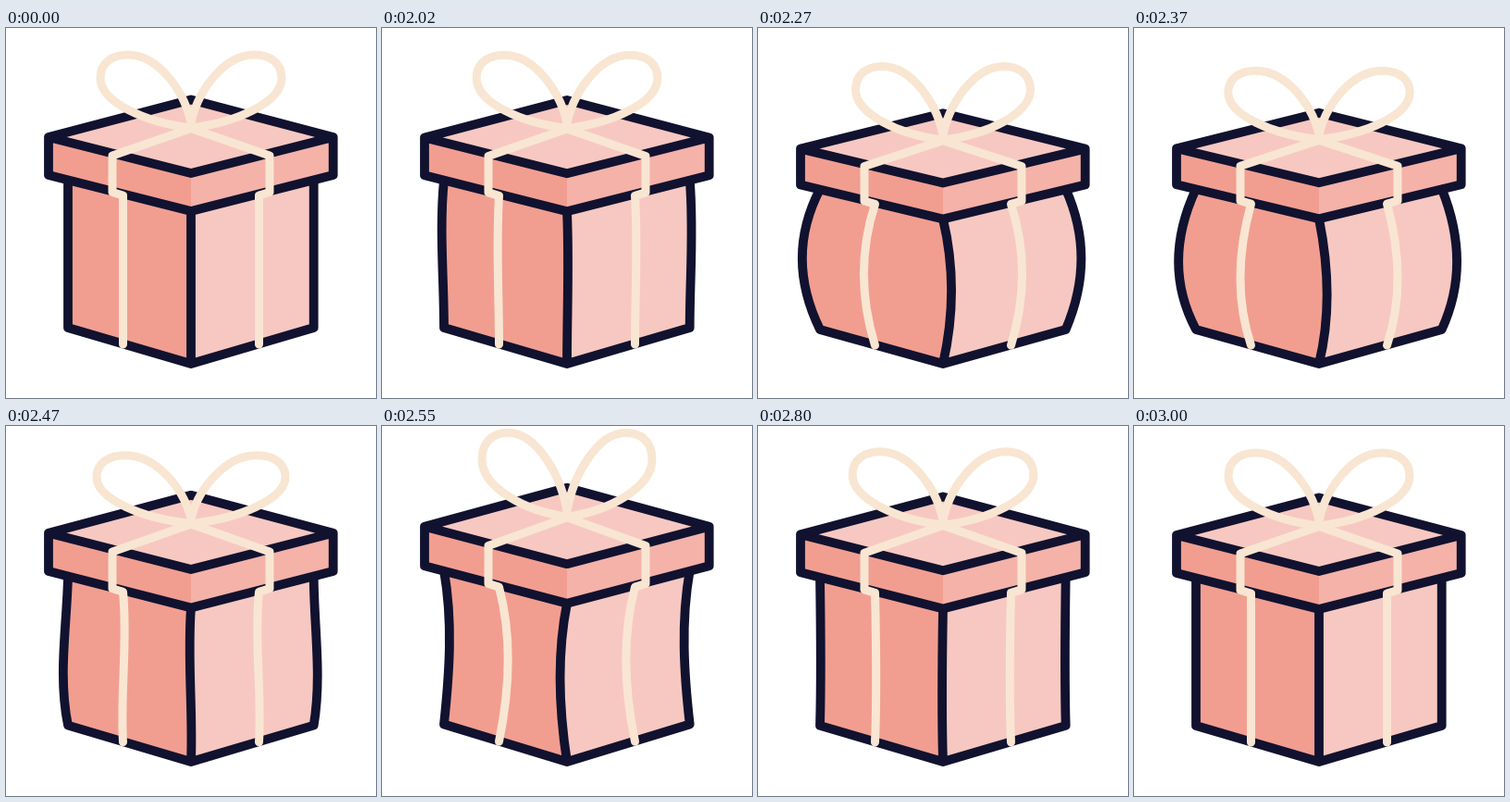
Recreate the animation shown at these times as an HTML page. Size 400 by 400 pixels, loop 3.02 s.

```html
<!DOCTYPE html>
<html lang="en">
<head>
<meta charset="utf-8">
<title>Gift box</title>
<style>
  html, body { margin: 0; width: 100%; height: 100%; overflow: hidden; background: #fff; }
  svg { display: block; width: 100vw; height: 100vh; }
  .line, .ribbon { fill: none; stroke-linecap: round; stroke-linejoin: round; }
  .line { stroke: #11122f; stroke-width: 9.8; }
  .ribbon { stroke: #f8e6d2; stroke-width: 9; }
  .dark { fill: #f19e90; }
  .mid { fill: #f4b2a9; }
  .light { fill: #f7c8c1; }
</style>
</head>
<body>
<svg viewBox="0 0 400 400">
  <path id="bodyLeft" class="dark"/>
  <path id="bodyRight" class="light"/>
  <path id="bodyLine" class="line"/>
  <path id="lidLeft" class="dark"/>
  <path id="lidRight" class="mid"/>
  <path id="lidTop" class="light"/>
  <path id="lidLine" class="line"/>
  <path id="ribbon" class="ribbon"/>
  <path id="bow" class="ribbon"/>
</svg>
<script>
const LOOP = 3020, START = 2020, REST = 2995, FLOOR = 363;

const smooth = p => (1 - Math.cos(Math.PI * p)) / 2;
const quadOut = p => 1 - (1 - p) ** 2;
const cubicOut = p => 1 - (1 - p) ** 3;

// Eased value through a few keys: [time, value, easing towards it]
function track(t, ...keys) {
  if (t <= keys[0][0]) return keys[0][1];
  const i = keys.findIndex(key => t < key[0]);
  if (i < 0) return keys[keys.length - 1][1];
  const [t0, from] = keys[i - 1], [t1, to, ease] = keys[i];
  return from + (to - from) * ease((t - t0) / (t1 - t0));
}

// The box is pressed down, springs up and settles
const height = t => track(t, [1980, 1], [2335, 0.944, smooth], [2550, 1.038, smooth], [REST, 1, cubicOut]);
const bowStretch = t => track(t, [2000, 1], [2180, 1.04, smooth], [2450, 0.918, smooth],
  [2570, 1.18, smooth], [2900, 1, cubicOut]);
const bulge = (t, out, inward) => track(t, [2000, 0], [2340, out, quadOut], [2570, -inward, smooth], [REST, 0, cubicOut]);

// Walls bend in a wave: the upper part leads, the lower part trails
const wall = (t, out, inward) => [bulge(t + 15, out, inward), bulge(t - 25, out, inward)];

// The movement advances in alternating steps of 30 and 20 ms
function stepTime(t) {
  if (t < START) return 0;
  const s = t - START;
  return START + 50 * Math.floor(s / 50) + (s % 50 >= 30 ? 25 : 0);
}

const set = (id, d) => document.getElementById(id).setAttribute('d', d);
const xy = (x, y) => `${x.toFixed(2)},${y.toFixed(2)} `;

function draw(time) {
  const t = stepTime(time) >= REST ? 0 : stepTime(time);
  const k = height(t);
  const pt = (x, y) => xy(x, FLOOR + (y - FLOOR) * k);
  const poly = (...pts) => 'M' + pts.map(p => pt(...p)).join('L');
  const bend = (x, y0, y1, [u, l], side = 1) =>
    'C' + pt(x + side * u, y0 + (y1 - y0) / 3) + pt(x + side * l, y0 + (y1 - y0) * 2 / 3) + pt(x, y1);

  const front = wall(t, 12.8, 11.5);
  const left = 'M' + pt(67, 164) + bend(67, 164, 324, wall(t, 27, 10), -1);
  const right = 'M' + pt(332.7, 164) + bend(332.7, 164, 324, wall(t, 23.5, 10));
  const toTop = 'L' + pt(200, 363) + bend(200, 363, 198, [front[1], front[0]]) + 'Z';
  set('bodyLeft', left + toTop);
  set('bodyRight', right + toTop);
  set('bodyLine', left + 'L' + pt(200, 363) + 'L' + pt(332.7, 324) + right
    + 'M' + pt(200, 198) + bend(200, 198, 363, front));

  const back = [200, 77.5], near = [200, 157], low = [200, 198];
  const west = [46, 118], east = [353.7, 118], westLow = [46, 159], eastLow = [353.7, 159];
  set('lidLeft', poly(west, near, low, westLow) + 'Z');
  set('lidRight', poly(east, near, low, eastLow) + 'Z');
  set('lidTop', poly(back, east, near, west) + 'Z');
  set('lidLine', poly(back, east, eastLow, low, westLow, west) + 'Z' + poly(west, near, east));

  const fold = wall(t, 17, 15);
  const strand = side => {
    const x = v => 200 + side * v;
    return poly([200, 108.5], [x(85), 138], [x(85), 177.5], [x(73.5), 181])
      + bend(x(73.5), 181, 342, fold, side);
  };
  set('ribbon', strand(-1) + strand(1));

  // Loops spread when they are flattened
  const tall = bowStretch(t);
  const wide = 1 - 0.55 * (tall - 1) + 0.6 * (k - 1);
  const knotY = FLOOR - 255 * k;
  const loop = side => {
    const p = (x, y) => xy(200 + side * x * wide, knotY - y * tall);
    return 'M' + p(0, 0) + 'C' + p(50, 6) + p(98, 28) + p(98, 54)
      + 'C' + p(98, 70) + p(86, 79) + p(68, 79)
      + 'C' + p(35, 79) + p(5, 38) + p(-1, 0);
  };
  set('bow', loop(-1) + loop(1));
}

const begin = performance.now();
function tick() {
  draw((performance.now() - begin) % LOOP);
  requestAnimationFrame(tick);
}
tick();
</script>
</body>
</html>
```
